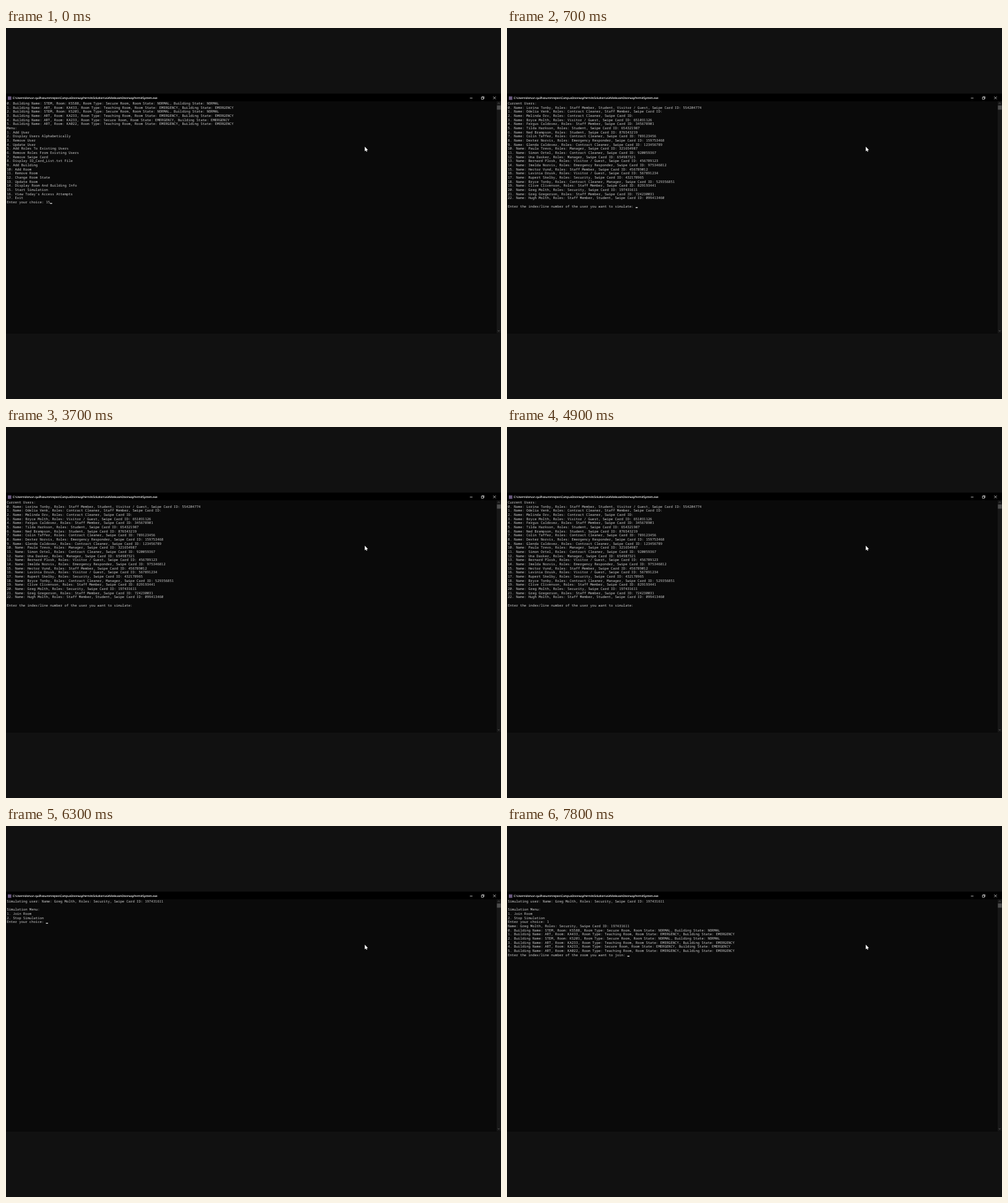
Write an HTML page that moves like this. It is 800 px wide and 601 px high and loops after 8 s.

```html
<!DOCTYPE html>
<html lang="en">
<head>
<meta charset="utf-8">
<title>Console session</title>
<style>
  html, body { margin: 0; width: 100%; height: 100%; overflow: hidden; background: #111; }
  svg { display: block; width: 800px; height: 601px; text-rendering: geometricPrecision; }
  .title { font: 4.58px "Open Sans", sans-serif; fill: #fff; stroke: #fff; stroke-width: .12; }
  .console { font: 13.333px "Noto Sans Mono", monospace; fill: #ccc; }
  .icons { fill: none; stroke: #eee; stroke-width: .7; }
</style>
</head>
<body>
<svg viewBox="0 0 800 601">
  <rect width="800" height="601" fill="#111"/>
  <rect y="106.3" width="800" height="388.2" fill="#000"/>
  <rect y="118.7" width="793" height="375.8" fill="#0a0a0a"/>

  <rect x="3" y="110.8" width="5.6" height="5.6" fill="#6b5a80"/>
  <text class="title" x="11" y="115.4">C:\Users\dorvan quill\source\repos\CampusDoorwayPermitsSolution\x64\Release\DoorwayPermitSystem.exe</text>
  <g class="icons">
    <path d="M749.7 113.5h4.2"/>
    <path d="M768.3 112.2h3.3v3.2h-3.3zM769.3 112.2v-1h3.3v3.2h-1"/>
    <path d="M787.4 111.1l4.2 4.2m0-4.2l-4.2 4.2"/>
  </g>

  <rect x="793" y="118.7" width="7" height="375.8" fill="#171717"/>
  <rect x="793.4" y="125.5" width="6.2" height="6.8" fill="#4d4d4d"/>
  <path d="M794.8 122.8l1.5-1.5 1.5 1.5M794.8 489.8l1.5 1.5 1.5-1.5" fill="none" stroke="#777" stroke-width=".7"/>

  <g class="console" transform="translate(1.2 118.7) scale(.416667)">
    <g id="lines"></g>
    <text id="typed"></text>
    <rect id="caret" width="8" height="3.2" fill="#e6e6e6"/>
  </g>

  <path d="M579.8 192.3v7.4l1.7-1.5 1.1 2.4 1.2-.5-1.1-2.3h2.3z" fill="#fff"/>
</svg>
<script>
const LOOP = 8000, COL = 8, ROW = 16, BASE = 12.5, CARET = 11.6;
const $ = id => document.getElementById(id);
const numbered = list => list.map((s, i) => `${i}. ${s}`);

const rooms = numbered([
  ['STEM', 'KS588', 'Secure', 'NORMAL'],
  ['ART', 'KA433', 'Teaching', 'EMERGENCY'],
  ['STEM', 'KS201', 'Secure', 'NORMAL'],
  ['ART', 'KA233', 'Teaching', 'EMERGENCY'],
  ['ART', 'KA233', 'Secure', 'EMERGENCY'],
  ['ART', 'KA022', 'Teaching', 'EMERGENCY']
].map(([b, r, type, state]) =>
  `Building Name: ${b}, Room: ${r}, Room Type: ${type} Room, Room State: ${state}, Building State: ${state}`));

const menu = ['Add User', 'Display Users Alphabetically', 'Remove User', 'Update User',
  'Add Roles To Existing Users', 'Remove Roles From Existing Users', 'Remove Swipe Card',
  'Display ID_Card_List.txt File', 'Add Building', 'Add Room', 'Remove Room',
  'Change Room State', 'Update Room', 'Display Room And Building Info', 'Start Simulation',
  "View Today's Access Attempts", 'Exit'
].map((s, i) => `${i + 1}${i === 9 ? ':' : '.'} ${s}`);

const STAFF = 'Staff Member', STUDENT = 'Student', GUEST = 'Visitor / Guest',
  CLEANER = 'Contract Cleaner', RESPONDER = 'Emergency Responder',
  MANAGER = 'Manager', SECURITY = 'Security';
const both = (...roles) => roles.join(', ');

const people = [
  ['Lorina Tonby', both(STAFF, STUDENT, GUEST), '554204774'],
  ['Odelia Venk', both(CLEANER, STAFF), ''],
  ['Melinda Orv', CLEANER, ''],
  ['Bryce Molth', GUEST, '651031126'],
  ['Fergus Caldovez', STAFF, '345678901'],
  ['Tilda Harkson', STUDENT, '654321987'],
  ['Ned Brampson', STUDENT, '876543219'],
  ['Colin Taffer', CLEANER, '789123456'],
  ['Dexter Norvis', RESPONDER, '159753468'],
  ['Glenda Caldovez', CLEANER, '123456789'],
  ['Paula Trevo', MANAGER, '321654987'],
  ['Simon Ortel', CLEANER, '920059367'],
  ['Una Dasker', MANAGER, '654987321'],
  ['Bernard Plosk', GUEST, '456789123'],
  ['Imelda Norvis', RESPONDER, '975346812'],
  ['Hector Vund', STAFF, '456789012'],
  ['Lavinia Drusk', GUEST, '567891234'],
  ['Rupert Skelby', SECURITY, '432178965'],
  ['Bryce Tonby', both(CLEANER, MANAGER), '529356851'],
  ['Clive Clivenson', STAFF, '829193441'],
  ['Greg Molth', SECURITY, '197431611'],
  ['Greg Gregerson', STAFF, '724230031'],
  ['Hugh Molth', both(STAFF, STUDENT), '099413460']
].map(([name, roles, id]) => `Name: ${name}, Roles: ${roles}, Swipe Card ID: ${id}`);

const chosen = people[20], ask = 'Enter your choice: ';
const simMenu = ['Simulating user: ' + chosen, '', 'Simulation Menu:',
  '1. Join Room', '2. Stop Simulation'];

// The last line of every screen is its prompt.
const screens = {
  main: [...rooms, 'Menu:', ...menu, ask],
  users: ['Current Users:', ...numbered(people), '',
    'Enter the index/line number of the user you want to simulate: '],
  sim: [...simMenu, ask],
  join: [...simMenu, ask + '1', chosen, ...rooms,
    'Enter the index/line number of the room you want to join: ']
};

// start time, screen, typed text, caret shown
const steps = [
  [0, 'main', '15', 1], [100, 'main', '15', 0],
  [700, 'users', '', 1], [1700, 'users', '', 0],
  [2100, 'users', '', 1], [2700, 'users', '', 0],
  [3300, 'users', '', 1], [3700, 'users', '', 0],
  [4300, 'users', '', 1], [4900, 'users', '', 0],
  [5300, 'users', '', 1], [5500, 'users', '2', 1],
  [5700, 'users', '20', 1], [5900, 'users', '20', 0],
  [6300, 'sim', '', 1], [6900, 'sim', '', 0], [7500, 'sim', '', 1],
  [7700, 'join', '', 1]
];

function place(el, x, y) {
  el.setAttribute('x', x);
  el.setAttribute('y', y);
}

const groups = {};
for (const [name, lines] of Object.entries(screens)) {
  const g = groups[name] = document.createElementNS('http://www.w3.org/2000/svg', 'g');
  lines.forEach((line, i) => {
    const t = document.createElementNS(g.namespaceURI, 'text');
    t.textContent = line;
    place(t, 0, i * ROW + BASE);
    g.append(t);
  });
  $('lines').append(g);
}

let shown;
function show(step) {
  if (step === shown) return;
  shown = step;
  const [, name, typed, caret] = step;
  const lines = screens[name], row = lines.length - 1, col = lines[row].length;
  for (const key in groups) groups[key].style.display = key === name ? '' : 'none';
  $('typed').textContent = typed;
  place($('typed'), col * COL, row * ROW + BASE);
  place($('caret'), (col + typed.length) * COL, row * ROW + CARET);
  $('caret').style.display = caret ? '' : 'none';
}

const start = performance.now();
function tick() {
  const t = (performance.now() - start) % LOOP;
  show(steps.findLast(s => s[0] <= t));
  requestAnimationFrame(tick);
}
tick();
</script>
</body>
</html>
```
